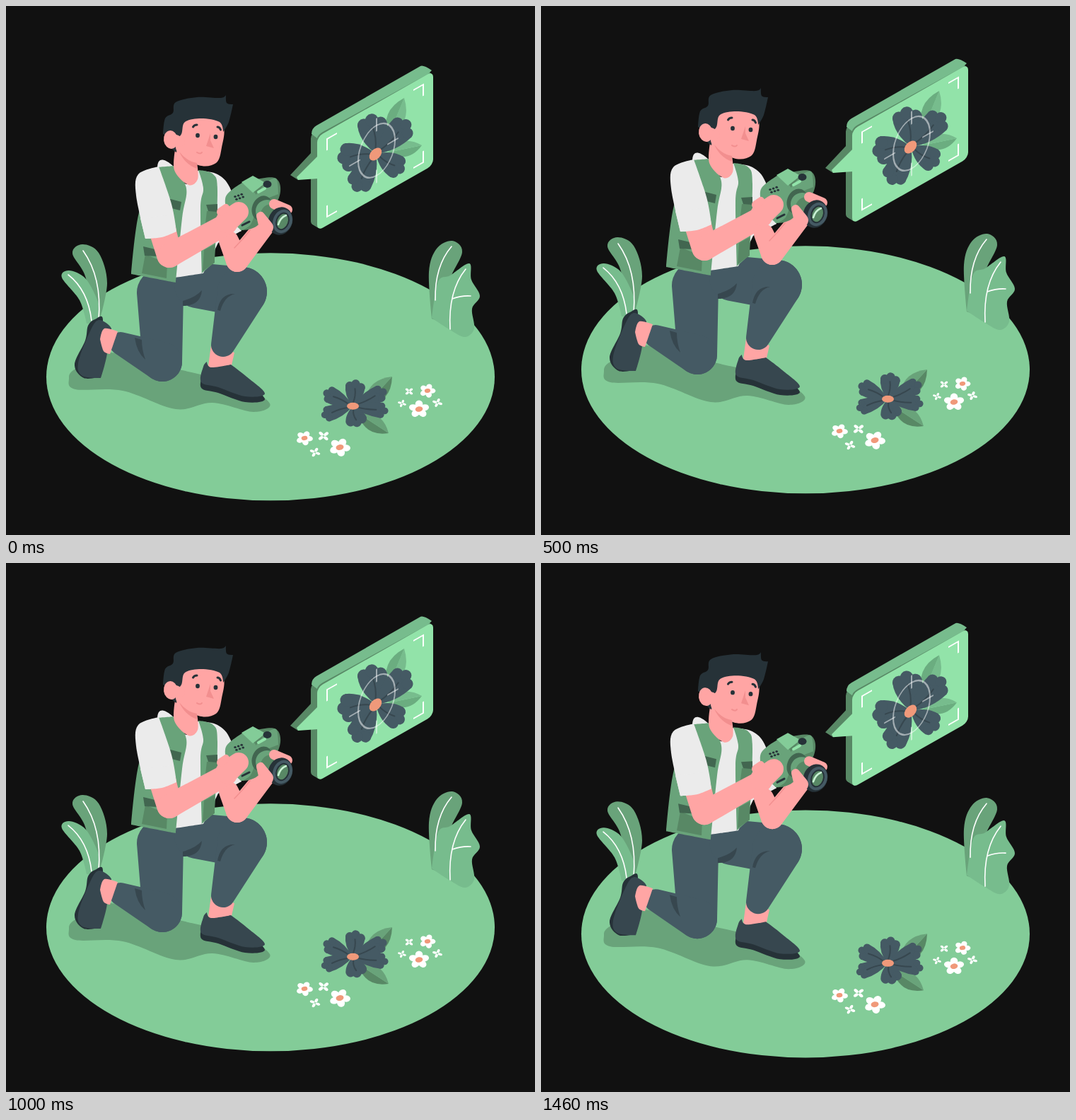
These frames come from a looping animation (748x748 px, 1500 ms). An HTML page:

```html
<!DOCTYPE html>
<html lang="en">
<head>
<meta charset="utf-8">
<title>Photographer</title>
<style>
  html, body { margin: 0; width: 100%; height: 100%; overflow: hidden; background: #111; }
  svg { display: block; width: 100vw; height: 100vh; }
</style>
</head>
<body>
<svg viewBox="0 0 748 748"><g id="scene"></g></svg>
<script>
const C = {
  mint: '#92e3a9', grass: '#83cc98', leaf: '#77bc8d', vest: '#69a37a', moss: '#588865', deep: '#426650',
  skin: '#ffa5a4', blush: '#f28f8f', shirt: '#ebebeb', slate: '#455a64', steel: '#37474f', ink: '#263238',
  orange: '#f0997a', white: '#fff'
};
const out = [];
const path = (fill, d) => out.push(`<path d="${d}" fill="${fill}"/>`);
const line = (color, width, d, alpha = 1) =>
  out.push(`<path d="${d}" fill="none" stroke="${color}" stroke-width="${width}" stroke-linecap="round" opacity="${alpha}"/>`);
const oval = (fill, x, y, rx, ry = rx, turn = 0) =>
  out.push(`<ellipse cx="${x}" cy="${y}" rx="${rx}" ry="${ry}" fill="${fill}" transform="rotate(${turn} ${x} ${y})"/>`);
function group(transform, draw) {
  out.push(`<g transform="${transform}">`);
  draw();
  out.push('</g>');
}

// Smooth closed shape through a few "x y" points; a trailing * makes a corner.
function shape(fill, text) {
  const pts = text.split(',').map(s => {
    const [x, y] = s.trim().replace('*', '').split(' ').map(Number);
    return { x, y, k: s.includes('*') ? 0 : 1 / 6 };
  });
  const at = i => pts[(i + pts.length) % pts.length];
  const curves = pts.map((b, i) => {
    const a = at(i - 1), c = at(i + 1), e = at(i + 2);
    return `C${b.x + (c.x - a.x) * b.k} ${b.y + (c.y - a.y) * b.k} ` +
           `${c.x - (e.x - b.x) * c.k} ${c.y - (e.y - b.y) * c.k} ${c.x} ${c.y}`;
  });
  path(fill, `M${pts[0].x} ${pts[0].y}${curves.join('')}Z`);
}

// Two circles joined by their outer tangents.
function limb(fill, x0, y0, r0, x1, y1, r1) {
  const a = Math.atan2(y1 - y0, x1 - x0);
  const b = Math.acos((r0 - r1) / Math.hypot(x1 - x0, y1 - y0));
  const on = (x, y, r, t) => `${x + r * Math.cos(t)} ${y + r * Math.sin(t)}`;
  path(fill, `M${on(x0, y0, r0, a + b)}A${r0} ${r0} 0 ${+(r0 > r1)} 1 ${on(x0, y0, r0, a - b)}` +
             `L${on(x1, y1, r1, a - b)}A${r1} ${r1} 0 ${+(r1 > r0)} 1 ${on(x1, y1, r1, a + b)}Z`);
}

// Pointed leaf from base to tip, its two halves in two tones.
function leaf(light, dark, x0, y0, x1, y1, width) {
  const mx = (x0 + x1) / 2, my = (y0 + y1) / 2, len = Math.hypot(x1 - x0, y1 - y0);
  const nx = (y1 - y0) / len * width, ny = (x0 - x1) / len * width;
  [[light, 1], [dark, -1]].forEach(([tone, s]) =>
    path(tone, `M${x0} ${y0}Q${mx + nx * s} ${my + ny * s} ${x1} ${y1}Z`));
}

// Petals are [angle, reach, half width], each ending in three lobes.
function bloom(x, y, petals) {
  const each = draw => petals.forEach(([turn, len, half]) =>
    group(`translate(${x} ${y}) rotate(${turn})`, () => draw(len, half)));
  each((len, half) => {
    const r = half * .44, end = len - r;
    path(C.slate, `M0 0Q${len * .35} ${-half} ${end * .9} ${-half}L${end} 0L${end * .9} ${half}Q${len * .35} ${half} 0 0Z`);
    [-1, 0, 1].forEach(s => oval(C.slate, end - Math.abs(s) * len * .1, s * (half - r), r));
  });
  each((len, half) => line(C.steel, 2, `M5 0Q${len * .4} ${half * .2} ${len * .66} 0`));
}

function daisy(x, y, r, turn, petals = 5) {
  const big = petals === 5;
  group(`translate(${x} ${y}) scale(1 .86) rotate(${turn})`, () => {
    for (let i = 0; i < petals; i++)
      group(`rotate(${i * 360 / petals})`, () => oval(C.white, 0, -r * .58, r * (big ? .38 : .28), r * .46));
  });
  if (big) oval(C.orange, x, y, r * .38, r * .27, -10);
}

function ground() {
  oval(C.grass, 374, 524.3, 317, 175);
  shape(C.vest, '89 527, 98 513, 146 490, 245 514, 330 535, 373 562, 350 574, 292 561, 240 570, 165 544, 98 542');
}

function plants() {
  shape(C.vest, '94 350, 108 337, 131 349, 143 392, 131 449*, 119 449*, 113 385');
  shape(C.leaf, '79 384, 89 374, 113 386, 132 424, 131 449*, 114 449*, 104 416');
  line(C.white, 1.6, 'M109 346Q136 384 131 443M88 380Q116 402 121 445');
  shape(C.vest, '602 442*, 598 376, 609 343, 631 332, 645 348, 626 390, 612 446*');
  shape(C.leaf, '602 441*, 611 390, 628 381, 655 364, 658 387, 670 410, 659 428, 662 456, 649 468, 628 458');
  line(C.white, 1.6, 'M630 340Q606 368 607 416M650 372Q625 403 628 457M631 414Q645 409 657 410');
}

function blossoms() {
  leaf(C.moss, C.vest, 507, 566, 546, 524, -25);
  leaf(C.moss, C.vest, 498, 576, 541, 604, -23);
  bloom(490, 566, [[-82, 38, 14], [-25, 53, 12], [8, 51, 11], [75, 30, 15], [163, 46, 11], [207, 46, 12]]);
  oval(C.orange, 490.5, 565.7, 8.5, 5);
  daisy(422, 611, 11.5, 25);
  daisy(472, 624, 14.5, 25);
  daisy(584, 570, 14, 0);
  daisy(596, 544, 11, 20);
  daisy(449, 608, 8.5, 48, 4);
  daisy(437, 631, 7.5, 25, 4);
  daisy(570, 545, 6.5, 45, 4);
  daisy(560, 562, 6, 20, 4);
  daisy(610, 561, 7, 20, 4);
}

function legs() {
  shape(C.ink, '97 507, 112 473, 116 452, 126 443, 137 444, 127 505, 134 524*, 110 526');
  shape(C.steel, '118 462, 131 444, 149 456, 136 470, 143 490, 134 526*, 108 523, 102 505');
  limb(C.slate, 218, 405, 33, 221, 503, 28);
  limb(C.slate, 221, 503, 28, 162, 477, 16);
  shape(C.skin, '133 471*, 139 456, 158 460*, 147 492*, 138 488');
  shape(C.skin, '290 480*, 323 490*, 318 512*, 296 515, 286 509*');
  limb(C.slate, 270, 395, 32, 334, 404, 35);
  limb(C.slate, 334, 404, 35, 307, 479, 17);
  path(C.steel, 'M182 469L192 472Q192 486 197 500Q185 490 182 469Z');
  path(C.steel, 'M277 402Q275 424 250 424V417Q268 412 277 402ZM324 407Q309 410 303 431L299 430Q303 406 324 407Z');
  const shoe = '284 503*, 290 511, 318 507*, 340 524, 366 548, 338 552, 300 539, 276 532, 279 510';
  group('translate(0 8)', () => shape(C.ink, shoe));
  shape(C.steel, shoe);
}

function torso() {
  shape(C.shirt, '237 227*, 255 252, 271 233*, 299 238, 318 260, 333 318*, 300 335*, 279 378*, 239 384*, 214 230');
  shape(C.vest, '214 228*, 238 226*, 255 258, 249 300, 240 391*, 177 379*, 188 292');
  shape(C.vest, '272 232*, 293 238, 299 262, 295 362*, 277 378*, 275 286, 279 258');
  path(C.moss, 'M284 290H299L300 306L282 307ZM280 345L295 337V363L278 375ZM197 351L228 364L227 385L192 378Z');
  path(C.deep, 'M229 272L248 277L246 289L234 286ZM283 281L299 280V291L286 290ZM194 340L211 344L214 354L196 353Z');
  shape(C.shirt, '216 227*, 187 238, 184 268, 197 329*, 220 327, 241 319*, 234 280');
}

function head() {
  shape(C.skin, '240 198*, 238 232, 258 253, 271 245, 270 222*');
  path(C.ink, 'M225 178Q226 198 241 207L250 160Z');
  shape(C.skin, '244 165*, 282 152, 307 170, 305 200, 297 222, 272 225, 241 204');
  path(C.blush, 'M245 206Q256 220 270 222V230Q253 224 245 206Z');
  shape(C.ink, '222 181*, 225 159, 236 151, 240 136, 270 129, 304 130, 311 125*, 312 137, 321 139*, 315 164, 307 178*, 302 164, 276 159, 253 164, 248 181, 239 190*');
  oval(C.skin, 233, 189, 10, 13, -8);
  limb(C.skin, 240, 190, 8, 246, 192, 7);
  oval(C.ink, 271, 183, 2.9, 3.2);
  oval(C.ink, 296.5, 185, 2.9, 3.2);
  line(C.ink, 3, 'M264.500 171Q266 168 270 168M299 171Q302 171 303.500 175');
  path(C.blush, 'M289 180V190L294 201L283 198Z');
  line(C.blush, 2, 'M270 207Q275 210 277 207');
}

function camera() {
  limb(C.skin, 315, 332, 14, 327, 360, 16);
  limb(C.skin, 327, 360, 16, 369, 307, 14);
  line(C.blush, 1.5, 'M323 342Q335 330 345 317');
  shape(C.moss, '312 268*, 334 250*, 380 243, 386 271, 356 310, 333 317*, 314 296');
  shape(C.vest, '311 269, 334 250*, 355 270, 347 307, 332 317*, 315 296');
  shape(C.vest, '354 266*, 368 249*, 382 244, 385 266*, 354 278*');
  path(C.grass, 'M333 249L349 240L367 250L349 264Z');
  line(C.mint, 4, 'M357 263L366 258');
  oval(C.ink, 369.5, 252, 6, 5);
  for (let i = 0; i < 6; i++) {
    const col = i % 3, row = +(i > 2);
    oval(C.ink, 324 + col * 4.6 + row * 2, 269.5 - col * 1.6 + row * 3.8, 1.8, 1.5);
  }
  line(C.ink, 3, 'M334 310L344 305');
  oval(C.deep, 362, 286, 14, 18, 20);
  limb(C.vest, 369, 290, 16, 386, 302, 18);
  limb(C.moss, 375, 295, 15, 387, 303, 18);
  limb(C.skin, 379, 280, 7, 398, 288, 7);
  oval(C.ink, 388, 304, 17, 20, 20);
  [[C.slate, 13.5], [C.ink, 9.5], [C.moss, 7.5]].forEach(([tone, r]) => oval(tone, 391, 304.5, r, r + 3.5, 20));
  line('#c9f2d5', 2.6, 'M385 309Q388 299 396 296');
  limb(C.skin, 360, 297, 6, 368, 313, 10);
}

function arm() {
  limb(C.skin, 222, 320, 19, 231, 352, 18);
  limb(C.skin, 231, 353, 17, 312, 308, 15);
  limb(C.skin, 312, 305, 16, 329, 291, 14);
  limb(C.skin, 304, 291, 6, 311, 285, 5);
  shape(C.shirt, '190 300*, 197 329*, 220 327, 241 319*, 236 295*');
}

function bubble() {
  const skew = 'matrix(1 -.567 0 1 522 204.5)';
  const slab = tone => out.push(`<rect x="-82" y="-66" width="164" height="133" rx="8" fill="${tone}"/>`);
  for (let i = 9; i > 0; i--)
    group(`translate(${-i} ${-i * .6})`, () => group(skew, () => slab(C.moss)));
  path(C.leaf, 'M432 181Q432 173 439 169L586 85Q590 83 602 91L597 96L448 178Q441 182 440 187Z');
  path(C.moss, 'M402 239L432 207L441 212L413 246Z');
  path(C.mint, 'M411 242L441 212V244L413 246Z');
  group(skew, () => {
    slab(C.mint);
    [-1, 1].forEach(sx => [-1, 1].forEach(sy =>
      out.push(`<path d="M${sx * 68} ${sy * 39}V${sy * 55}H${sx * 54}" fill="none" stroke="#fff" stroke-width="2"/>`)));
  });

  leaf(C.leaf, '#6bad80', 540, 186, 563, 130, -25);
  leaf('#6bad80', C.leaf, 540, 207, 588, 197, -22);
  bloom(523, 209, [[-97, 57, 21], [-44, 67, 18], [32, 47, 17], [120, 61, 18], [173, 55, 20]]);
  oval(C.orange, 522.5, 209.5, 10.5, 7, -47);

  group(skew, () => {
    out.push('<ellipse cx="2" cy="1" rx="26" ry="35.5" fill="none" stroke="#fff" stroke-width="2" opacity=".5"/>');
    [-1, 1].forEach(s => line(C.white, 2, `M2 ${s * 45 + 1}V${s * 28 + 1}M${s * 34 - 2} 1H${s * 20 - 2}`, .5));
  });
}

[ground, plants, blossoms, legs, torso, head, camera, arm, bubble].forEach(draw => draw());
const scene = document.getElementById('scene');
scene.innerHTML = out.join('');

// The whole drawing floats up and down at 24 steps per second.
const LOOP = 1500, RISE = 14.96, LEAD = 25;
const lift = t => RISE * (1 - Math.abs(1 - (t % LOOP) / (LOOP / 2)));
const start = performance.now();
function tick(now) {
  const t = Math.max(0, now - start) % LOOP;
  const step = Math.min(35, Math.floor((t + 5) * .024));
  const y = lift(LEAD) - lift(step / .024 + LEAD);
  scene.setAttribute('transform', `translate(0 ${y.toFixed(3)})`);
  requestAnimationFrame(tick);
}
tick(start);
</script>
</body>
</html>
```
